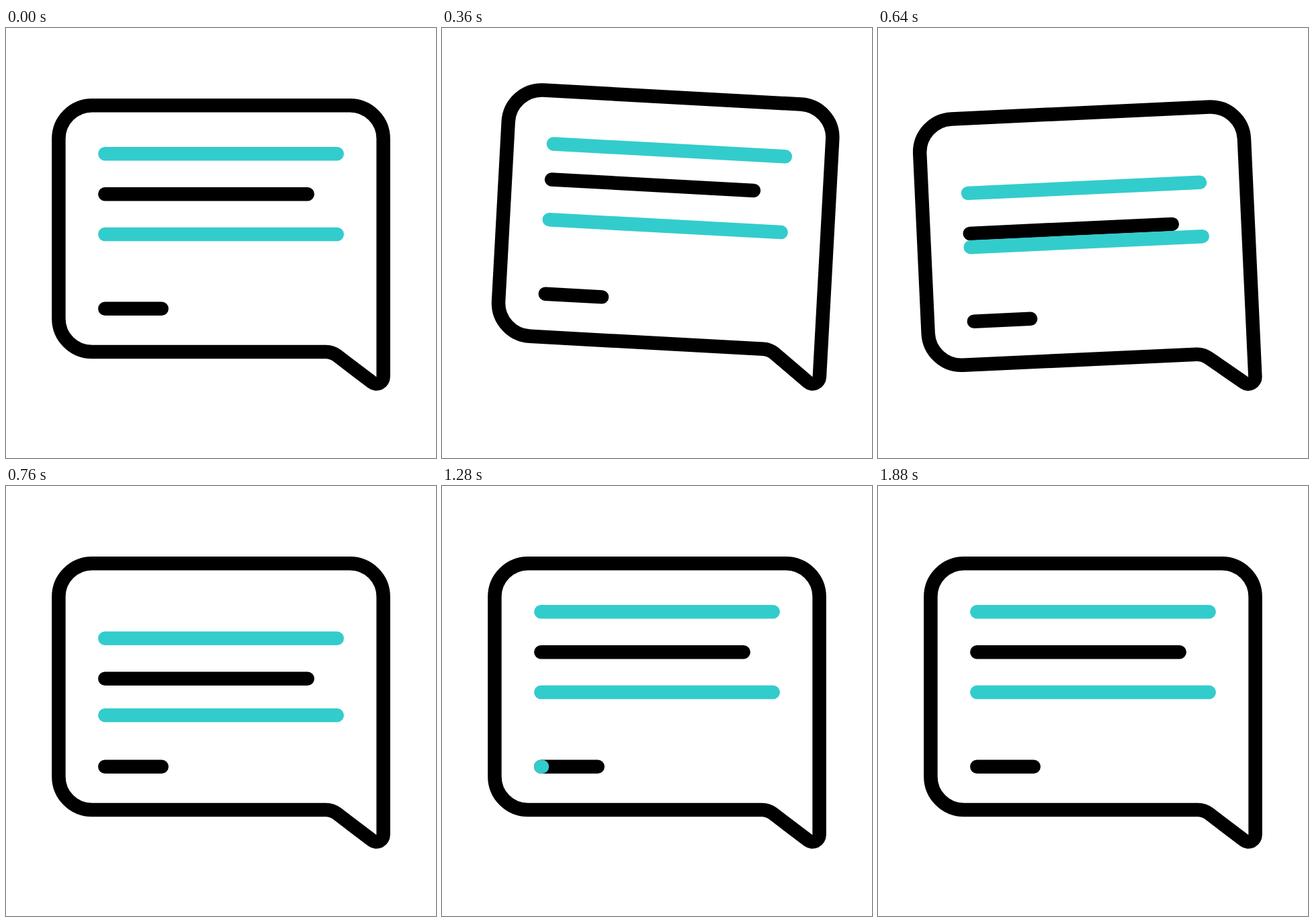
These frames come from a looping animation (640 by 640 pixels, 2000 ms). An HTML page:

```html
<!DOCTYPE html>
<html lang="en">
<head>
<meta charset="utf-8">
<title>Speech bubble</title>
<style>
  html, body { margin: 0; width: 100%; height: 100%; overflow: hidden; background: #fff; }
  svg { display: block; width: 100%; height: 100%; }
  path { fill: none; stroke: #000; stroke-width: 20.5; stroke-linecap: round; stroke-linejoin: round; }
  .teal { stroke: #3cc; }
</style>
</head>
<body>
<svg viewBox="0 0 640 640">
  <g id="bubble">
    <path d="M128 115.2H512A49.6 49.6 0 0 1 561.6 164.8V519.2A10.3 10.3 0 0 1 545 527.4L492.8 487.7A28 28 0 0 0 476 482H128A49.6 49.6 0 0 1 78.4 432.4V164.8A49.6 49.6 0 0 1 128 115.2Z"/>
    <path class="bar teal" d="M147.3 187.2H492.7"/>
    <path class="bar" d="M147.3 247.3H448.7"/>
    <path class="bar teal" d="M147.3 307.1H492.7"/>
    <path d="M147.3 417.8H231.7"/>
    <path id="fill" class="teal"/>
  </g>
</svg>
<script>
const STEP = 40, LOOP = 2000;
const bubble = document.getElementById('bubble');
const bars = document.querySelectorAll('.bar');
const fill = document.getElementById('fill');

// Keys are [step, value] pairs; every segment eases in and out.
const tilt = [[2, 0], [6, -10], [9.85, 5], [15.2, -3], [19, 0]];
const drop = (start, end) => [[start, 0], [end, 39.5], [24, 39.5], [28, -10], [32, 0]];
const drops = [drop(7.9, 12), drop(12, 16), drop(16, 19.9)];
const fillEnd = [[31, 0], [43, 1]];
const fillStart = [[37, 0], [47, 1]];

function valueAt(keys, f) {
  if (f <= keys[0][0]) return keys[0][1];
  for (let i = 1; i < keys.length; i++) {
    const [f0, a] = keys[i - 1], [f1, b] = keys[i];
    if (f < f1) {
      const t = (f - f0) / (f1 - f0);
      return a + (b - a) * t * t * (3 - 2 * t);
    }
  }
  return keys[keys.length - 1][1];
}

function draw(now) {
  const f = Math.floor((now % LOOP) / STEP);
  bubble.setAttribute('transform', `rotate(${valueAt(tilt, f)} 554 524)`);
  bars.forEach((bar, i) => bar.setAttribute('transform', `translate(0 ${valueAt(drops[i], f)})`));
  const from = valueAt(fillStart, f), to = valueAt(fillEnd, f);
  const x = p => 147.3 + 84.4 * p;
  fill.setAttribute('d', to > from ? `M${x(from)} 417.8H${x(to)}` : '');
}

const begin = performance.now();
function tick() {
  draw(performance.now() - begin);
  requestAnimationFrame(tick);
}
tick();
</script>
</body>
</html>
```
